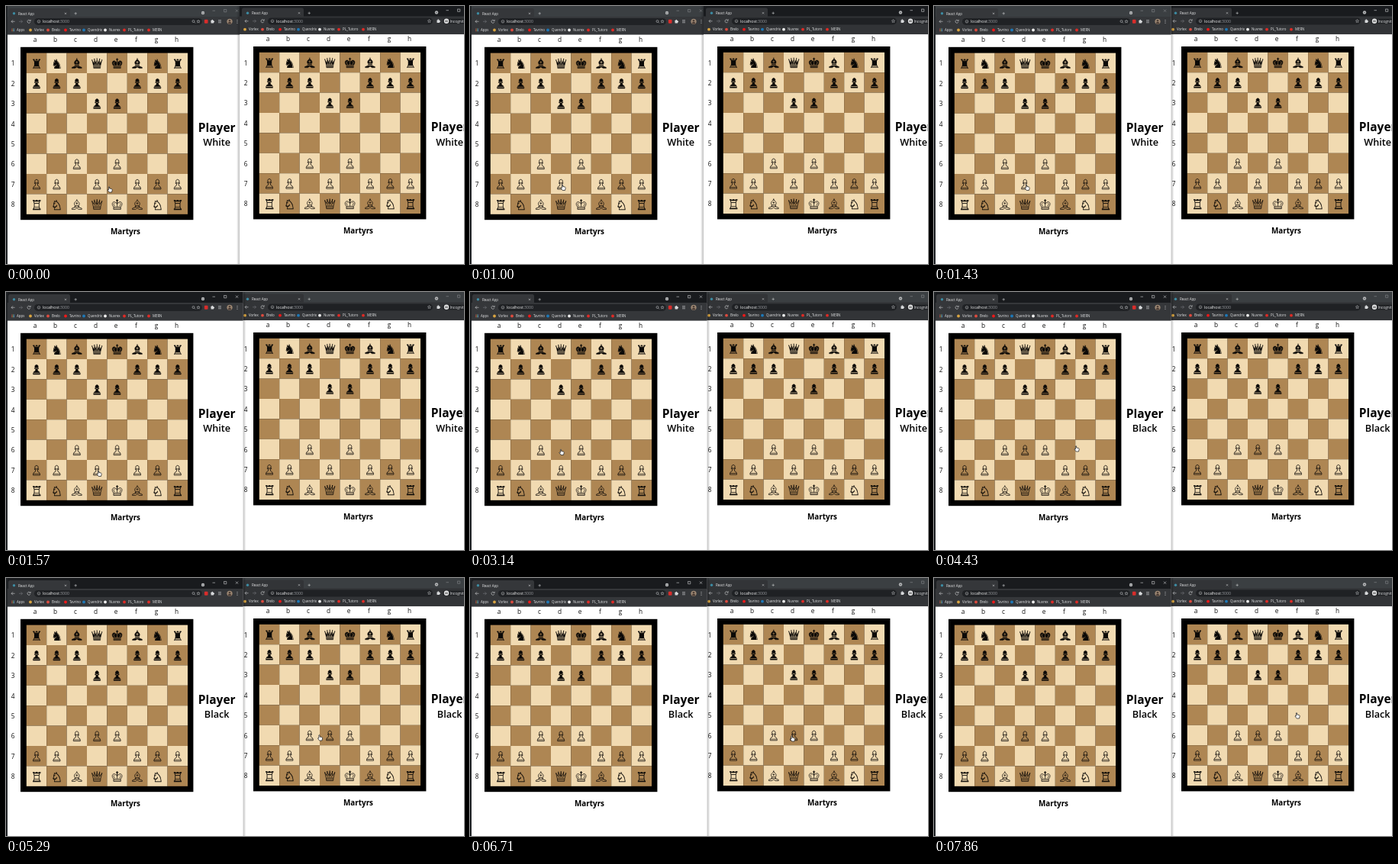
Animation, 600 px wide and 338 px high, one loop 8000 ms. Source, as an HTML page with a canvas:

```html
<!DOCTYPE html>
<html lang="en">
<head>
<meta charset="utf-8">
<title>Chess in two windows</title>
<style>
html, body { margin: 0; width: 100%; height: 100%; overflow: hidden; background: #fff; }
canvas { display: block; width: 600px; height: 338px; }
</style>
</head>
<body>
<canvas id="stage"></canvas>
<script>
const W = 600, H = 338, LOOP = 8000;
const canvas = document.getElementById('stage');
const ctx = canvas.getContext('2d');
const ratio = window.devicePixelRatio || 1;
canvas.width = W * ratio;
canvas.height = H * ratio;

const UI = '"Open Sans", "Noto Sans", sans-serif';
const CHESS = '"DejaVu Sans", sans-serif';
const CELL = 26.4, INK = '#0b0907';
const SWAP = 1430, FOCUS = 1570, MOVE = 4140;

// time, x, y of the pointer's centre
const route = [
  [0, 136, 240], [140, 136, 240], [570, 122, 237.5], [2000, 122, 237.5],
  [2570, 120, 209.5], [4000, 120, 209.5], [4140, 127, 209], [4430, 187, 205],
  [4710, 300, 206], [5000, 400, 208], [5570, 422.5, 210], [7000, 422.5, 210],
  [7570, 476, 180], [8000, 476, 180]
];

const bookmarks = [
  ['Vorlex', 32, '#d9a441'], ['Brelo', 55, '#dd4b3e'], ['Tavrino', 78, '#f01818'],
  ['Quendrix', 102, '#1d78b8'], ['Nuvrex', 130, '#eeeeee'],
  ['PL_Tutoro', 155, '#e02a25'], ['MERN', 187, '#e02a25']
];

// body, inner lines and finial of each drawn piece, around its cell's centre
const shapes = {
  p: [
    'M-4.5 6.3V4.8Q-4.2 2.6-1.6 1.6L-1.2-1.2H-2.6V-2.4H-1.3A2.2 2.2 0 1 1 1.3-2.4H2.6V-1.2H1.2L1.6 1.6Q4.2 2.6 4.5 4.8V6.3Z',
    'M-4.2 4.6H4.2M-1.3-1.8H1.3', ''
  ],
  b: [
    'M0-5.3C3.6-3 4-.6 2.4 1.2L2.8 3.2H1.6L6.4 5V6.3H2.4L0 4.6L-2.4 6.3H-6.4V5L-1.6 3.2H-2.8L-2.4 1.2C-4-.6-3.6-3 0-5.3Z',
    'M0-3.2V0M-1.5-1.7H1.5M-2.5 1.3H2.5M-2.7 3.1H2.7', 'M0-6.7V-5.4'
  ],
  q: [
    'M-4.4 6.3L-4.8 2.6L-6.4-4L-3.4 0L-3.4-5.2L-1-.2L0-5.8L1-.2L3.4-5.2L3.4 0L6.4-4L4.8 2.6L4.4 6.3Z',
    'M-4.7 2.8H4.7M-4.4 4.6H4.4M-2.4 2.4V0M0 2.4V-2M2.4 2.4V0',
    'M-7-4.4H-5.9M-4-5.8H-2.8M-.6-6.3H.6M2.8-5.8H4M5.9-4.4H7'
  ],
  k: [
    'M-4.7 6.3L-4.6 3.2C-8-.6-6-4-3.2-3.4Q-.8-2.8 0 0Q.8-2.8 3.2-3.4C6-4 8-.6 4.6 3.2L4.7 6.3Z',
    'M-4.6 3H4.6M-4.5 4.7H4.5M0 0V3M-3.4 2Q-6-1-3.2-2.2M3.4 2Q6-1 3.2-2.2',
    'M0-1.5V-6.8M-1.6-5.3H1.6'
  ]
};
for (const key in shapes) shapes[key] = shapes[key].map(d => new Path2D(d));
const glyphs = { r: '♜', n: '♞', R: '♖', N: '♘' };

function rect(x, y, w, h, fill) {
  ctx.fillStyle = fill;
  ctx.fillRect(x, y, w, h);
}

function round(x, y, w, h, r, fill) {
  ctx.fillStyle = fill;
  ctx.beginPath();
  ctx.roundRect(x, y, w, h, r);
  ctx.fill();
}

function dot(x, y, r, fill) {
  ctx.fillStyle = fill;
  ctx.beginPath();
  ctx.arc(x, y, r, 0, 7);
  ctx.fill();
}

function ring(x, y, r, color, from = 0, to = 7) {
  ctx.strokeStyle = color;
  ctx.lineWidth = 0.6;
  ctx.beginPath();
  ctx.arc(x, y, r, from, to);
  ctx.stroke();
}

function line(color, ...pts) {
  ctx.strokeStyle = color;
  ctx.lineWidth = 0.6;
  ctx.beginPath();
  for (let i = 0; i < pts.length; i += 2) ctx.lineTo(pts[i], pts[i + 1]);
  ctx.stroke();
}

function cross(x, y, r, color) {
  line(color, x - r, y - r, x + r, y + r);
  line(color, x + r, y - r, x - r, y + r);
}

function text(str, x, y, size, color, align = 'left', weight = 400, family = UI) {
  ctx.font = `${weight} ${size}px ${family}`;
  ctx.textAlign = align;
  ctx.textBaseline = 'alphabetic';
  ctx.fillStyle = color;
  ctx.fillText(str, x, y);
}

function tabStrip(active, toolbar) {
  const control = active ? '#d0d2d4' : '#85888b';
  rect(0, 0, 320, 15, active ? '#191b1e' : '#3b3f42');
  round(3, 3, 81, 13, [2.5, 2.5, 0, 0], toolbar);
  dot(10.5, 9.8, 1.7, '#3d8ca3');
  text('React App', 16, 11.7, 4.5, '#e4e5e6');
  cross(78, 9.8, 1.1, '#c6c8ca');
  line('#c6c8ca', 89.5, 9.8, 92.9, 9.8);
  line('#c6c8ca', 91.2, 8.1, 91.2, 11.5);
  dot(258, 9, 2.2, '#b4b6b8');
  line('#2a2c2e', 257, 8.6, 258, 9.6, 259, 8.6);
  line(control, 270.5, 6.2, 274, 6.2);
  line(control, 285.6, 4.6, 288.8, 4.6, 288.8, 7.8, 285.6, 7.8, 285.6, 4.3);
  cross(302.5, 6.2, 1.6, control);
}

function toolbarRow(toolbar, field, barEnd) {
  rect(0, 14, 320, 23.6, toolbar);
  line('#d2d4d6', 11.5, 20.3, 7, 20.3);
  line('#d2d4d6', 9, 18.3, 7, 20.3, 9, 22.3);
  line('#777a7e', 17, 20.3, 21.5, 20.3);
  line('#777a7e', 19.5, 18.3, 21.5, 20.3, 19.5, 22.3);
  ring(30, 20.3, 2, '#d2d4d6', 0.4, 5.7);
  line('#d2d4d6', 32.2, 17.8, 32.2, 19.6, 30.5, 19.6);
  round(37, 15.9, barEnd - 37, 9, 4.5, field);
  ring(43, 20.3, 1.8, '#b0b2b4');
  line('#b0b2b4', 43, 20, 43, 21.4);
  text('localhost', 48, 22.2, 5.2, '#f4f5f6', 'left', 500);
  const w = ctx.measureText('localhost').width;
  text(':3000', 48 + w, 22.2, 5.2, '#9a9da1');
}

function star(x, y) {
  ctx.strokeStyle = '#c0c2c4';
  ctx.lineWidth = 0.5;
  ctx.beginPath();
  for (let i = 0; i < 10; i++) {
    const a = i * Math.PI / 5 - Math.PI / 2, r = i % 2 ? 1 : 2.2;
    ctx.lineTo(x + r * Math.cos(a), y + r * Math.sin(a));
  }
  ctx.closePath();
  ctx.stroke();
}

function puzzle(x, y) {
  round(x - 2, y - 1.5, 3.6, 3.8, 0.6, '#d6d8da');
  dot(x - 0.2, y - 1.7, 0.8, '#d6d8da');
  dot(x + 1.8, y + 0.4, 0.8, '#d6d8da');
}

function bookmarkRow(shift, y) {
  for (const [name, x, color] of bookmarks) {
    dot(x + shift, y, 1.9, color);
    text(name, x + shift + 5, y + 1.6, 4.4, '#e6e7e8');
  }
}

function drawPiece(code, x, y, cell) {
  const white = code < 'a';
  if (glyphs[code]) {
    text(glyphs[code], x, y + 6.7, 17.3, INK, 'center', 400, CHESS);
    if (white) {
      ctx.strokeStyle = INK;
      ctx.lineWidth = 0.3;
      ctx.strokeText(glyphs[code], x, y + 6.7);
    }
    return;
  }
  const [body, inner, finial] = shapes[code.toLowerCase()];
  ctx.save();
  ctx.translate(x, y);
  ctx.lineJoin = 'round';
  ctx.fillStyle = ctx.strokeStyle = INK;
  ctx.lineWidth = white ? 0.75 : 0.4;
  if (!white) ctx.fill(body);
  ctx.stroke(body);
  ctx.lineWidth = 1.1;
  ctx.stroke(finial);
  ctx.lineWidth = 0.65;
  ctx.strokeStyle = white ? INK : cell;
  ctx.stroke(inner);
  ctx.restore();
}

function game(moved) {
  for (let i = 0; i < 8; i++) {
    text('abcdefgh'[i], 38 + i * 26.5, 47, 8.3, '#111', 'center', 500);
    text(i + 1, 9, 78.3 + i * 26.4, 8.3, '#111', 'center', 500);
  }
  rect(19, 53.8, 226.4, 226.4, '#000');
  const rows = [
    'rnbqkbnr', 'ppp  ppp', '   pp   ', '', '',
    moved ? '  PPP   ' : '  P P   ',
    moved ? 'PP   PPP' : 'PP P PPP',
    'RNBQKBNR'
  ];
  for (let r = 0; r < 8; r++) {
    for (let c = 0; c < 8; c++) {
      const x = 26.8 + c * CELL, y = 61.6 + r * CELL;
      const cell = (r + c) % 2 ? '#f1dab1' : '#ae8653';
      rect(x, y, CELL, CELL, cell);
      const code = rows[r][c] || ' ';
      if (code !== ' ') drawPiece(code, x + CELL / 2, y + CELL / 2 + 0.5, cell);
    }
  }
  text('Player', 276.2, 165, 15.5, '#000', 'center', 700);
  text(moved ? 'Black' : 'White', 276.2, 183.4, 12.7, '#000', 'center', 600);
  text('Martyrs', 156.5, 298.7, 9.9, '#000', 'center', 700);
}

function leftWindow(front, active, moved) {
  const end = front ? 310.5 : 306;
  ctx.save();
  ctx.beginPath();
  ctx.rect(0, 0, end, H);
  ctx.clip();
  rect(0, 0, end, H, '#fff');
  game(moved);
  const bar = '#35373a';
  tabStrip(active, bar);
  toolbarRow(bar, '#202225', 257);
  ring(245.5, 20, 1.5, '#c0c2c4');
  line('#c0c2c4', 246.6, 21.1, 248, 22.5);
  star(252, 20.3);
  round(259.9, 17.8, 4.6, 5, 1, '#d92d2b');
  puzzle(270.5, 20.2);
  for (let i = 0; i < 3; i++) {
    line('#c8cacc', 278, 18.6 + i * 1.6, 282, 18.6 + i * 1.6);
    dot(303, 18.4 + i * 1.9, 0.5, '#d2d4d6');
  }
  dot(293, 20.3, 3.6, '#9b8672');
  dot(293, 19.3, 1.3, '#4a3c35');
  round(290.8, 21, 4.4, 2.4, [2, 2, 1, 1], '#4a3c35');
  for (let i = 0; i < 9; i++) {
    rect(7.4 + (i % 3) * 1.4, 29.5 + Math.floor(i / 3) * 1.4, 1, 1, ['#e55645', '#6ba965', '#5b91d8'][i % 3]);
  }
  text('Apps', 14, 33.1, 4.4, '#e6e7e8');
  bookmarkRow(0, 31.5);
  rect(0, 0, 2, H, '#202326');
  ctx.restore();
}

function rightWindow(active, moved) {
  ctx.save();
  ctx.beginPath();
  ctx.rect(306, 0, W - 306, H);
  ctx.clip();
  rect(306, 0, W - 306, H, '#fff');
  ctx.save();
  ctx.translate(305, -0.8);
  game(moved);
  ctx.restore();
  ctx.translate(306, -0.5);
  const bar = '#323437';
  tabStrip(active, bar);
  toolbarRow(bar, '#1f2124', 253);
  star(248.5, 20.3);
  puzzle(260.5, 20.2);
  round(266, 17, 60, 7, 3.5, '#222427');
  dot(271, 20.3, 3.2, '#e3e4e5');
  rect(269.1, 19.3, 3.8, 0.7, '#333');
  dot(270, 21.1, 0.7, '#333');
  dot(272, 21.1, 0.7, '#333');
  text('Incognito', 275.5, 22.1, 4.9, '#e3e4e5');
  bookmarkRow(-25, 31.2);
  ctx.restore();
}

function shade(x, width) {
  const g = ctx.createLinearGradient(x, 0, x + width, 0);
  g.addColorStop(0, 'rgba(0,0,0,.25)');
  g.addColorStop(1, 'rgba(0,0,0,0)');
  rect(Math.min(x, x + width), 0, Math.abs(width), H, g);
}

function pointerAt(t) {
  let i = 1;
  while (i < route.length - 1 && route[i][0] < t) i++;
  const [t0, x0, y0] = route[i - 1], [t1, x1, y1] = route[i];
  const k = Math.min(1, (t - t0) / (t1 - t0));
  return [x0 + (x1 - x0) * k, y0 + (y1 - y0) * k];
}

const handPath = new Path2D('M1.6 5V.9Q2.2-.2 2.8.9V3L5.6 3.6Q6.5 3.9 6.4 5L5.7 8H2.4L.1 5Q.3 4 1.6 5Z');

function hand(x, y) {
  ctx.save();
  ctx.translate(x - 3.2, y - 4);
  ctx.fillStyle = '#fff';
  ctx.fill(handPath);
  ctx.strokeStyle = '#161616';
  ctx.lineWidth = 0.7;
  ctx.lineJoin = 'round';
  ctx.stroke(handPath);
  ctx.restore();
}

function draw(now) {
  const step = Math.floor((now % LOOP + 5) * 7 / 1000);
  const t = Math.min(LOOP, Math.round(step * 100 / 7) * 10);
  const moved = t >= MOVE, leftActive = t >= FOCUS;
  ctx.setTransform(ratio, 0, 0, ratio, 0, 0);
  if (t < SWAP) {
    leftWindow(false, leftActive, moved);
    shade(306, -4);
    rightWindow(!leftActive, moved);
  } else {
    rightWindow(!leftActive, moved);
    shade(310.5, 4);
    leftWindow(true, leftActive, moved);
  }
  hand(...pointerAt(t));
}

function tick() {
  draw(performance.now());
  requestAnimationFrame(tick);
}
tick();
</script>
</body>
</html>
```
